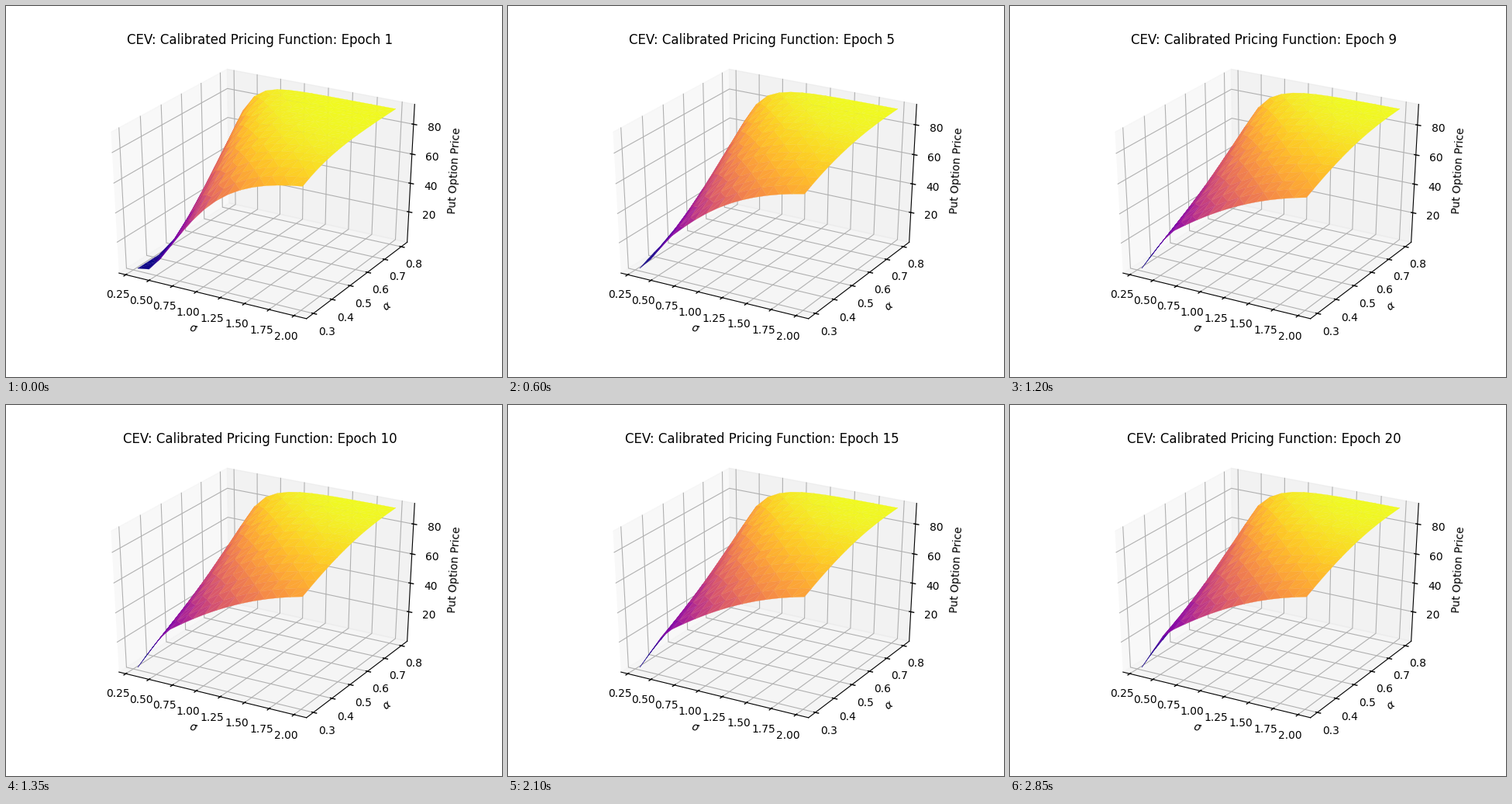
These frames come from a looping animation (640 by 478 pixels, 4.2 s). A matplotlib script:

```python
import math

import numpy as np
import matplotlib.pyplot as plt
from matplotlib.animation import FuncAnimation
from matplotlib.collections import PolyCollection
from matplotlib.tri import Triangulation

W, H, DPI = 640, 478, 100
FRAMES, INTERVAL, LAST_EPOCH = 28, 150, 20

# Plot area in pixels, measured from the top left corner.
LEFT, TOP, WIDTH, HEIGHT = 0.125 * W, 0.12 * H, 0.775 * W, 0.77 * H

# Everything is drawn in a unit cube centred on the origin.
EDGE = 0.5 + 1 / 48
DELTA = 1 / 12
POINT = 48 / (72 * (WIDTH + HEIGHT) / DPI) * DELTA
TICK_LABEL = EDGE + 11.5 * POINT
AXIS_LABEL = EDGE + 25 * POINT
TICK_IN, TICK_OUT = EDGE - 0.1 * DELTA, EDGE + 0.2 * DELTA

ELEV, AZIM, DISTANCE = math.radians(30), math.radians(-60), 10
TOWARD = np.array([math.cos(ELEV) * math.cos(AZIM),
                   math.cos(ELEV) * math.sin(AZIM), math.sin(ELEV)])
RIGHT = np.array([-math.sin(AZIM), math.cos(AZIM), 0])
UP = np.cross(TOWARD, RIGHT)

X_LIM, Y_LIM = (0.215, 2.085), (0.275, 0.825)
erf = np.vectorize(math.erf)


def project(points):
    """Perspective view of cube points as pixel positions."""
    points = np.asarray(points, dtype=float)
    w = DISTANCE - points @ TOWARD
    x = LEFT + (points @ RIGHT / w + 0.095) / 0.185 * WIDTH
    y = TOP + (0.09 - points @ UP / w) / 0.185 * HEIGHT
    return np.stack([x, y], axis=-1)


def unit(value, limits):
    low, high = limits
    return (value - low) / (high - low) - 0.5


def early_price(s, a):
    k = (a - 0.3) / 0.5
    start = 0.385 - 0.35 * k
    gain, width = 1.25 + 1.15 * k, 0.947 - 0.257 * k
    rise = (np.maximum(s - start, 0) / width) ** 1.4
    return 0.2 + 91.1 * erf(gain * (1 - np.exp(-rise)))


def late_price(s, a, epoch):
    growth = np.exp((2.62 - 0.24 * s ** 2) * (a - 0.3))
    price = 92 * erf(0.495 * s * (1 - 0.0106 * s ** 3) * growth)
    depth = 7 + 7.4 * np.exp(-(a - 0.3) / 0.1)
    ramp = np.maximum(0, 1 - (s - 0.3) / (0.34 - 0.004 * epoch))
    return price - depth * ramp


def surface(epoch):
    mix = 1 - math.exp(-((epoch - 1) / 3.8) ** 1.7)
    return ((1 - mix) * early_price(sigma, alpha)
            + mix * late_price(sigma, alpha, epoch))


sigma, alpha = (g.ravel() for g in np.meshgrid(np.linspace(0.3, 2, 15),
                                               np.linspace(0.3, 0.8, 15)))
triangles = Triangulation(sigma, alpha).triangles

fig = plt.figure(figsize=(W / DPI, H / DPI + 1e-9), dpi=DPI, facecolor="white")
ax = fig.add_axes([0, 0, 1, 1])
ax.set_xlim(0, W)
ax.set_ylim(H, 0)
ax.axis("off")


def polyline(points, color="black", width=0.8, zorder=3):
    return ax.plot(*project(points).T, color=color, lw=width, zorder=zorder)[0]


def label(point, text, **style):
    x, y = project(point)
    style = {"ha": "center", "va": "top", "fontsize": 10, "zorder": 4} | style
    return ax.text(x, y, text, **style)


def pane(corners, gray):
    ax.add_patch(plt.Polygon(project(corners), closed=False, fc=str(gray),
                             ec=str(gray), lw=1, alpha=0.5, zorder=1))


def axis_name(point, start, end, text):
    (x0, y0), (x1, y1) = project([start, end])
    angle = math.degrees(math.atan2(y0 - y1, x1 - x0))
    label(point, text, va="center", rotation=angle, rotation_mode="anchor")


def x_paths(t):
    return ([(t, EDGE, EDGE), (t, EDGE, -EDGE), (t, -EDGE, -EDGE)],
            [(t, -TICK_IN, -EDGE), (t, -TICK_OUT, -EDGE)],
            (t, -TICK_LABEL, -TICK_LABEL))


def y_paths(t):
    return ([(-EDGE, t, EDGE), (-EDGE, t, -EDGE), (EDGE, t, -EDGE)],
            [(TICK_IN, t, -EDGE), (TICK_OUT, t, -EDGE)],
            (TICK_LABEL, t, -TICK_LABEL))


def z_paths(t):
    return ([(-EDGE, -EDGE, t), (-EDGE, EDGE, t), (EDGE, EDGE, t)],
            [(TICK_IN, EDGE, t), (TICK_OUT, EDGE, t)],
            (TICK_LABEL, TICK_LABEL, t))


def add_tick(paths, text):
    grid, tick, spot = paths
    return (polyline(grid, "#b0b0b0", zorder=2), polyline(tick, width=1.0),
            label(spot, text))


E = EDGE
pane([(-E, -E, -E), (-E, E, -E), (-E, E, E), (-E, -E, E)], 0.95)
pane([(-E, E, -E), (E, E, -E), (E, E, E), (-E, E, E)], 0.90)
pane([(-E, -E, -E), (E, -E, -E), (E, E, -E), (-E, E, -E)], 0.925)

corners = [(-E, -E, -E), (E, -E, -E), (E, E, -E), (E, E, E)]
names = [r"$\sigma$", r"$\alpha$", "Put Option Price"]
spots = [(0, -AXIS_LABEL, -AXIS_LABEL), (AXIS_LABEL, 0, -AXIS_LABEL),
         (AXIS_LABEL, AXIS_LABEL, 0)]
for start, end, name, spot in zip(corners, corners[1:], names, spots):
    polyline([start, end])
    axis_name(spot, start, end, name)

for value in np.arange(0.25, 2.01, 0.25):
    add_tick(x_paths(unit(value, X_LIM)), f"{value:.2f}")
for value in np.arange(0.3, 0.81, 0.1):
    add_tick(y_paths(unit(value, Y_LIM)), f"{value:.1f}")
z_ticks = {v: add_tick(z_paths(0), str(v)) for v in (20, 40, 60, 80)}

mesh = PolyCollection([], cmap="plasma", linewidths=0.2, edgecolors="face",
                      antialiaseds=True, zorder=5)
ax.add_collection(mesh, autolim=False)
title = ax.text(LEFT + WIDTH / 2, TOP - 6 * DPI / 72, "", ha="center",
                va="baseline", fontsize=12)


def update(frame):
    epoch = min(frame + 1, LAST_EPOCH)
    price = surface(epoch)
    z_lim = price.min(), price.max()

    points = np.column_stack([unit(sigma, X_LIM), unit(alpha, Y_LIM),
                              unit(price, z_lim)])
    faces = points[triangles]
    order = np.argsort((faces @ TOWARD).mean(axis=1))
    heights = price[triangles].mean(axis=1)
    mesh.set_verts(project(faces[order]))
    mesh.set_array(heights[order])
    mesh.set_clim(heights.min(), heights.max())

    for value, (grid, tick, text) in z_ticks.items():
        grid_path, tick_path, spot = z_paths(unit(value, z_lim))
        grid.set_data(*project(grid_path).T)
        tick.set_data(*project(tick_path).T)
        text.set_position(project(spot))

    title.set_text(f"CEV: Calibrated Pricing Function: Epoch {epoch}")
    return [mesh, title]


animation = FuncAnimation(fig, update, frames=FRAMES, interval=INTERVAL,
                          repeat=True, repeat_delay=0, blit=False)
plt.show()
```
